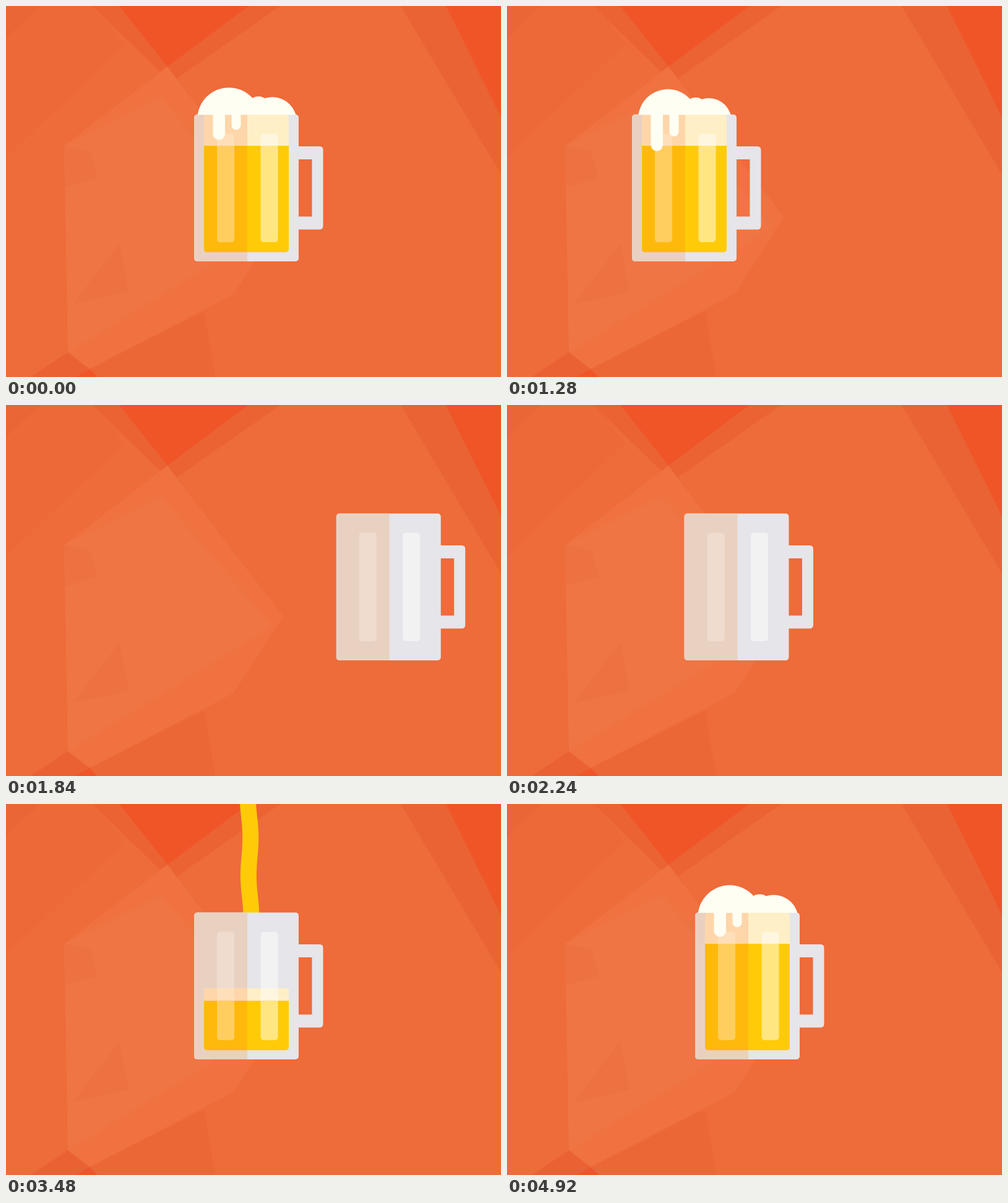
An HTML page that plays this animation: 800x600 px, repeating every 4.96 s.

```html
<!DOCTYPE html>
<html lang="en">
<head>
<meta charset="utf-8">
<title>Beer mug</title>
<style>
  html, body { margin: 0; width: 100%; height: 100%; overflow: hidden; background: #ee6b3a; }
  svg { display: block; width: 100vw; height: 100vh; }
</style>
</head>
<body>
<svg viewBox="0 0 800 600" preserveAspectRatio="none">
  <defs>
    <clipPath id="inner"><rect x="16" y="175.5" width="137" height="223" rx="5"/></clipPath>
    <clipPath id="level"><rect id="levelBox" x="0" y="226" width="169" height="180"/></clipPath>
    <clipPath id="band"><rect id="bandBox" x="0" y="176" width="169" height="50"/></clipPath>
    <clipPath id="above"><rect x="-120" y="-120" width="240" height="120"/></clipPath>
    <clipPath id="leftHalf"><rect y="170" width="86" height="250"/></clipPath>
    <rect id="shineL" x="37" y="206.5" width="28" height="175.5" rx="5"/>
    <rect id="shineR" x="107.5" y="206.5" width="28" height="175.5" rx="5"/>
  </defs>

  <g id="backdrop">
    <rect width="800" height="600" fill="#ee6b3a"/>
    <path fill="#ed6a38" d="M0 0H145L190 62 0 245Z"/>
    <path fill="#eb6637" d="M0 0H55L0 52Z"/>
    <path fill="#eb6233" d="M140 0H183L261 98 392 0H443L276 117 320 175Z"/>
    <path fill="#f05528" d="M183 0H392L261 98Z"/>
    <path fill="#e96334" d="M638 0H711L800 180V272Z"/>
    <path fill="#f05528" d="M711 0H800V180Z"/>
    <path fill="#ec6736" d="M135 587 320 494 338 600H148Z"/>
    <path fill="#ea6233" d="M40 600 100 560 135 587 112 600Z"/>
    <path fill="#f05528" d="M112 600 135 587 148 600Z"/>
    <path fill="#ef7240" d="M94 226 261 98 448 342 368 466 135 587 100 560Z"/>
    <path fill="#ef7544" d="M94 226 250 148 430 358 100 560Z"/>
    <path fill="#ee7141" d="M136 235 148 278 95 293 94 226ZM183 385 198 462 108 482Z"/>
  </g>

  <path id="stream" fill="#ffcb08"/>

  <g id="mug">
    <path fill="#e5e5ea" fill-rule="evenodd" d="M160 227H202.500Q208.500 227 208.500 233V355.500Q208.500 361.500 202.500 361.500H160ZM168 248V340.500H190.500V248Z"/>
    <rect y="175.500" width="169" height="237.500" rx="5" fill="#e5e5ea"/>
    <rect y="175.500" width="169" height="237.500" rx="5" fill="#e9d1c1" clip-path="url(#leftHalf)"/>
    <use href="#shineL" fill="#f0dccf"/>
    <use href="#shineR" fill="#f2f2f3"/>
    <g clip-path="url(#inner)">
      <g clip-path="url(#band)">
        <rect x="16" y="170" width="70" height="240" fill="#ffd6a9"/>
        <rect x="86" y="170" width="67" height="240" fill="#ffefc6"/>
        <use href="#shineL" fill="#ffdfb9"/>
        <use href="#shineR" fill="#fff6e0"/>
      </g>
      <g clip-path="url(#level)">
        <rect x="16" y="170" width="70" height="240" fill="#ffb90d"/>
        <rect x="86" y="170" width="67" height="240" fill="#ffcb08"/>
        <use href="#shineL" fill="#ffce5e"/>
        <use href="#shineR" fill="#ffe681"/>
      </g>
    </g>
    <g id="foam" fill="#fffef2">
      <g clip-path="url(#above)">
        <circle cx="-27" cy="6.500" r="48"/>
        <circle cx="18" cy="-10" r="18"/>
        <circle cx="39" cy="10" r="37"/>
      </g>
    </g>
    <g fill="#fffef2">
      <path id="dripA"/>
      <path id="dripB"/>
    </g>
  </g>
</svg>
<script>
const LOOP = 4960, REST = 304, RIM = 176, FLOOR = 398.5;
const $ = id => document.getElementById(id);
const part = (t, from, to) => Math.min(1, Math.max(0, (t - from) / (to - from)));
const inBack = p => p * p * (2.70158 * p - 1.70158);
const outBack = p => 1 - inBack(1 - p);
const outQuad = p => 1 - (1 - p) * (1 - p);

// Leaves on the left after a swing right, returns from the right
function mugX(t) {
  if (t < 1615) return REST - 514 * inBack(part(t, 258, 1608));
  return 800 + (REST - 800) * outBack(part(t, 1634, 3124));
}

function setBox(id, top, height) {
  $(id).setAttribute('y', top);
  $(id).setAttribute('height', Math.max(0, height));
}

function drip(id, x, width, length) {
  const r = Math.min(width / 2, length);
  const y = RIM + length - r;
  $(id).setAttribute('d', length <= 0 ? '' :
    `M${x} ${RIM - 1}H${x + width}V${y}A${width / 2} ${r} 0 0 1 ${x} ${y}Z`);
}

function streamPath(t) {
  const top = Math.max(0, (t - 4170) * 1.44);
  const tip = Math.min(RIM + 14, (t - 2800) * 1.44);
  if (tip <= top) return '';
  const mid = y => 392.7 + y * 0.01 +
    2 * Math.cos((y - 77 - (t - 2880) * 0.392) * Math.PI / 65);
  const left = [], right = [];
  for (let y = top; ; y = Math.min(tip, y + 8)) {
    left.push(`${mid(y) - 13} ${y}`);
    right.unshift(`${mid(y) + 13} ${y}`);
    if (y >= tip) break;
  }
  return 'M' + left.concat(right).join('L') + 'Z';
}

function draw(t) {
  $('mug').setAttribute('transform', `translate(${mugX(t)})`);
  $('stream').setAttribute('d', streamPath(t));

  // The beer from the last pour stays until the mug is away
  const pour = t < 1615 ? t + LOOP : t;
  const surface = FLOOR - (FLOOR - 226) * part(pour, 2960, 4080);
  const head = 50 * part(pour, 2960, 4250);
  setBox('levelBox', surface, FLOOR - surface);
  setBox('bandBox', surface - head, surface > FLOOR - 0.1 ? 0 : head + 0.5);

  const grow = Math.max(0, outBack(part(pour, 4170, 5220)));
  $('foam').setAttribute('transform', `translate(85 ${RIM}) scale(${grow})`);
  $('foam').setAttribute('visibility', grow > 0.001 ? 'visible' : 'hidden');
  const run = outQuad(part(pour, 4180, 5940));
  drip('dripA', 30.5, 19.5, 58.5 * run);
  drip('dripB', 60.5, 15, 35 * run);
}

const start = performance.now();
function tick() {
  draw((performance.now() - start) % LOOP);
  requestAnimationFrame(tick);
}
draw(0);
requestAnimationFrame(tick);
</script>
</body>
</html>
```
